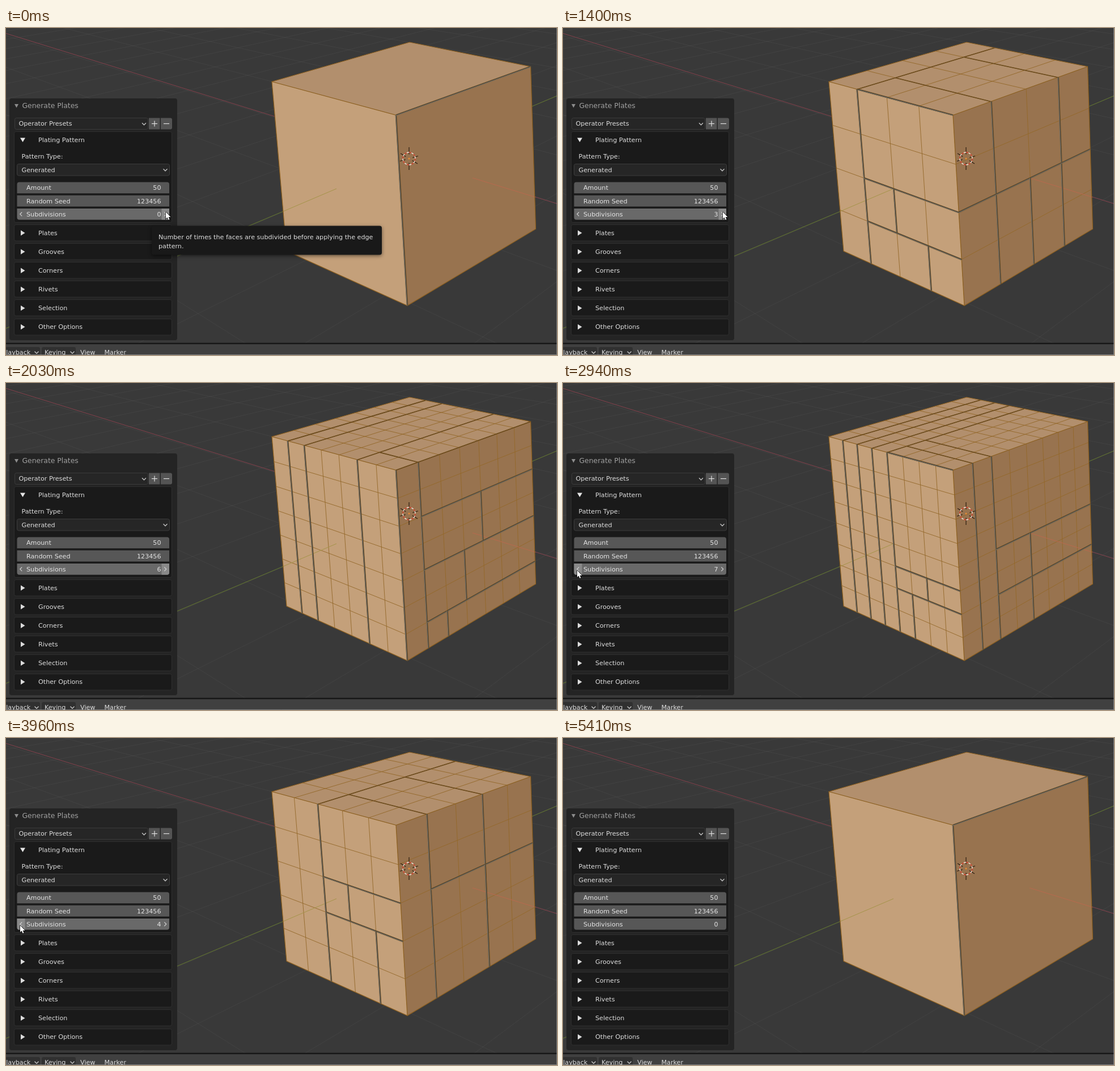
Write an HTML page with a canvas that moves like this. It is 972 px wide and 576 px high and loops after 5530 ms.

```html
<!DOCTYPE html>
<html lang="en">
<head>
<meta charset="utf-8">
<title>Generate Plates</title>
<style>
html, body { margin: 0; width: 100%; height: 100%; overflow: hidden; background: #393939; }
canvas { display: block; }
</style>
</head>
<body>
<canvas id="stage" width="972" height="576"></canvas>
<script>
const ctx = document.getElementById('stage').getContext('2d');
const LOOP = 5530;

// ---- timeline ----
const ups = [590, 1160, 1280, 1520, 1790, 2030, 2150];
const downs = [3210, 3600, 3840, 4080, 4200, 4350, 4470];
const path = [[0, 282, 324], [2430, 282, 324], [2790, 45, 324], [2940, 25, 330], [4600, 25, 330],
  [4740, 109, 378], [4890, 669, 502], [5160, 599, 147], [LOOP, 599, 147]];

const passed = (list, t) => list.filter(c => c <= t).length;
const levelAt = t => passed(ups, t) - passed(downs, t);
// the pointer is hidden while the button is held
const pressed = t => t < 4200 && [...ups, ...downs].some(c => t >= c && t < c + 120);

function pointerAt(t) {
  const i = path.findIndex(p => p[0] > t);
  const [t0, x0, y0] = path[i - 1], [t1, x1, y1] = path[i];
  const k = (t - t0) / (t1 - t0);
  return [x0 + (x1 - x0) * k, y0 + (y1 - y0) * k];
}

// Main cuts per level: full columns, rows, and the column where the rows begin
const cuts = [
  { L: [[], [], 0], R: [[0], [0], 0] },
  { L: [[1], [], 0], R: [[], [1], 0] },
  { L: [[1], [2], 1], R: [[1], [1], 1] },
  { L: [[1], [0, 2, 3], 1], R: [[1, 3], [2], 0] },
  { L: [[2], [2, 3], 2], R: [[1, 3], [2], 1] },
  { L: [[], [2, 4], 0], R: [[1, 2, 3, 4, 5], [2, 5], 3] },
  { L: [[1, 2, 5, 7], [], 0], R: [[1], [2, 4, 6], 1] },
  { L: [[1, 2, 3, 4], [0, 5, 6], 4], R: [[1, 2], [4, 6], 2] }
];
const random = seed => {
  const s = Math.sin(seed * 12.9898) * 43758.5453;
  return s - Math.floor(s);
};

// ---- projection: unit square to a quad with corners p0..p3 ----
function plane([x0, y0], [x1, y1], [x2, y2], [x3, y3]) {
  const ax = x1 - x2, bx = x3 - x2, ay = y1 - y2, by = y3 - y2;
  const sx = x0 - x1 + x2 - x3, sy = y0 - y1 + y2 - y3, det = ax * by - bx * ay;
  const g = (sx * by - bx * sy) / det, h = (ax * sy - sx * ay) / det;
  return (u, v) => {
    const w = 1 + g * u + h * v;
    return [((x1 - x0 + g * x1) * u + (x3 - x0 + h * x3) * v + x0) / w,
            ((y1 - y0 + g * y1) * u + (y3 - y0 + h * y3) * v + y0) / w];
  };
}
const A = [469, 94.5], B = [712, 25], C = [925.5, 68], D = [688, 153.5];
const E = [495, 393], F = [708, 489], G = [934.5, 354];
const faces = {
  L: { at: plane(A, D, F, E), fill: '#c4a07a' },
  T: { at: plane(A, D, C, B), fill: '#b28f6d' },
  R: { at: plane(D, C, G, F), fill: '#98734f' }
};
const ground = plane([711.5, 229.5], [823.5, 263.5], [697, 326], [583, 284]);

// ---- drawing helpers ----
function line(points, color, width = 1) {
  ctx.beginPath();
  points.forEach(p => ctx.lineTo(...p));
  ctx.strokeStyle = color;
  ctx.lineWidth = width;
  ctx.stroke();
}
function shape(points, fill) {
  ctx.beginPath();
  points.forEach(p => ctx.lineTo(...p));
  ctx.closePath();
  ctx.fillStyle = fill;
  ctx.fill();
}
function box(x, y, w, h, fill, r = 3, border) {
  ctx.beginPath();
  ctx.roundRect(x, y, w, h, r);
  ctx.fillStyle = fill;
  ctx.fill();
  if (border) {
    ctx.strokeStyle = border;
    ctx.lineWidth = 1;
    ctx.stroke();
  }
}
function text(s, x, y, color = '#dedede', align = 'left', size = 11.15) {
  ctx.font = size + 'px "DejaVu Sans", sans-serif';
  ctx.textAlign = align;
  ctx.fillStyle = color;
  ctx.fillText(s, x, y);
}
const down = (x, y) => line([[x - 3.5, y - 1.7], [x, y + 1.8], [x + 3.5, y - 1.7]], '#c4c4c4', 1.3);
const side = (x, y, d) => line([[x - 1.7 * d, y - 3.5], [x + 1.7 * d, y], [x - 1.7 * d, y + 3.5]], '#d4d4d4', 1.2);
const plus = (x, y) => line([[x, y - 5], [x, y + 5]], '#e0e0e0', 1.2);
const minus = (x, y) => line([[x - 5, y], [x + 5, y]], '#e0e0e0', 1.2);

// ---- scene ----
function drawGround() {
  ctx.fillStyle = '#393939';
  ctx.fillRect(0, 0, 972, 576);
  for (let k = -20; k <= 6; k++) {
    line([ground(k, -20), ground(k, 6)], 'rgba(255,255,255,.045)');
    line([ground(-20, k), ground(6, k)], 'rgba(255,255,255,.045)');
  }
  line([[0, 9.5], [972, 309.5]], '#82404b');
  line([[0, 529], [972, 119.5]], '#64782f');
}

const column = (face, k, from, to, n) => groove(face, [face.at(k / n, from / n), face.at(k / n, to / n)], -.7, 0);
const row = (face, k, from, to, n) => groove(face, [face.at(from / n, k / n), face.at(to / n, k / n)], 0, .7);

function groove(face, ends, dx, dy) {
  if (face === faces.T) return line(ends, '#6a4a1c', 1.6);
  line(ends, '#7a5720', 2.8);
  line(ends, '#484239', 1.7);
  line(ends.map(([x, y]) => [x + dx, y + dy]), '#86827a', .8);
}

function drawGrooves(level) {
  const n = level + 1, { L, R } = cuts[level];
  for (const [name, [cols, rows, start]] of Object.entries({ L, R })) {
    const face = faces[name];
    cols.forEach(k => column(face, k, 0, n, n));
    rows.forEach((k, i) => {
      row(face, k, start, n, n);
      // one short column splits the band below each row
      const split = start + 1 + Math.floor(random(level * 9 + k) * (n - start - 1));
      if (k && split < n) column(face, split, k, rows[i + 1] || n, n);
    });
  }
  // side columns run on across the top
  const last = Math.max(0, ...L[0].filter(k => k < n));
  L[0].forEach(k => column(faces.T, k, 0, n, n));
  R[0].forEach(k => k && row(faces.T, k, last, n, n));
}

function drawCube(level) {
  const n = level + 1;
  for (const { at, fill } of Object.values(faces)) {
    shape([at(0, 0), at(1, 0), at(1, 1), at(0, 1)], fill);
    for (let k = 1; k < n; k++) {
      line([at(k / n, 0), at(k / n, 1)], '#94682a', .9);
      line([at(0, k / n), at(1, k / n)], '#94682a', .9);
    }
  }
  line([[489, 323], [583, 283]], '#a59449');
  line([[823, 264], [934, 298]], '#b9694e');
  line([A, B, C, G, F, E, A, D, F], '#8d6020', 1.2);
  line([D, C], '#8d6020', 1.2);
  drawGrooves(level);
}

function drawOrigin() {
  const x = 711, y = 230;
  for (const [dx, dy] of [[0, 20], [16, -4.5], [15, 9]])
    for (const s of [-1, 1])
      line([[x + dx * s * .38, y + dy * s * .38], [x + dx * s, y + dy * s]], '#2a1d12', 1.2);
  ctx.lineWidth = 1.4;
  for (let i = 0; i < 16; i++) {
    ctx.beginPath();
    ctx.arc(x, y, 11, i * Math.PI / 8, (i + 1) * Math.PI / 8);
    ctx.strokeStyle = i % 2 ? '#f2e6dc' : '#d8402f';
    ctx.stroke();
  }
  box(x - 1.5, y - 1.5, 3, 3, '#e88a34', 1.5);
}

function drawField(label, value, y, r, hover, px) {
  box(19.5, y, 268.5, 19.7, hover ? '#696969' : '#575757', r);
  if (hover) {
    if (px < 34) box(19.5, y, 14, 19.7, '#898989', [0, 0, 0, 4]);
    if (px > 273) box(274.5, y, 13.5, 19.7, '#898989', [0, 0, 4, 0]);
    side(26.5, y + 9.7, -1);
    side(281, y + 9.7, 1);
  }
  text(label, 36, y + 13.7, '#e4e4e4');
  text(value, 273.5, y + 13.7, '#e4e4e4', 'right');
}

function drawPanel(level, hover, px) {
  box(6, 124, 296, 426, '#242424', 4);
  shape([[15, 134], [22, 134], [18.5, 140.5]], '#8c8c8c');
  text('Generate Plates', 28.5, 141.2, '#a0a0a0', 'left', 12.4);

  box(15.5, 158.5, 235, 20, '#262626', 3, '#3b3b3b');
  text('Operator Presets', 22.5, 172.2);
  down(243.5, 169);
  box(252, 158.5, 19.5, 20, '#545454', 0);
  box(273, 158.5, 20, 20, '#545454', [0, 3, 3, 0]);
  plus(262, 168.5);
  minus(262, 168.5);
  minus(283, 168.5);

  box(14.5, 182.5, 278, 160, '#1a1a1a', 3, '#2f2f2f');
  shape([[25, 193.5], [34, 193.5], [29.5, 201]], '#e6e6e6');
  text('Plating Pattern', 57, 200.8);
  text('Pattern Type:', 27.5, 230.2);
  box(19.5, 239.5, 269, 20.5, '#262626', 3, '#3d3d3d');
  text('Generated', 27.5, 253.7);
  down(281, 250);
  drawField('Amount', '50', 271.5, [4, 4, 0, 0]);
  drawField('Random Seed', '123456', 294.8, 0);
  drawField('Subdivisions', level, 318.1, [0, 0, 4, 4], hover, px);

  ['Plates', 'Grooves', 'Corners', 'Rivets', 'Selection', 'Other Options'].forEach((name, i) => {
    const y = 361 + i * 33.1;
    box(14.5, Math.round(y - 15) + .5, 278, 28.5, '#1a1a1a', 3, '#2f2f2f');
    shape([[26, y - 4.7], [26, y + 4.7], [33.5, y]], '#dcdcdc');
    text(name, 57, y + 3.9);
  });
}

function drawFooter() {
  ctx.fillStyle = '#404040';
  ctx.fillRect(0, 555, 972, 21);
  ctx.fillStyle = '#181818';
  ctx.fillRect(0, 554.5, 972, 2.5);
  box(-5, 562, 65, 20, '#303030', 3);
  box(63, 562, 60, 20, '#303030', 3);
  text('Playback', -6.5, 575.2);
  down(54, 571.5);
  text('Keying', 68, 575.2);
  down(117, 571.5);
  text('View', 131, 575.2);
  text('Marker', 173.5, 575.2);
  line([[0, 575.5], [971.5, 575.5], [971.5, 0]], 'rgba(190,190,190,.5)');
}

function drawTooltip() {
  ctx.save();
  ctx.shadowColor = 'rgba(0,0,0,.5)';
  ctx.shadowBlur = 6;
  ctx.shadowOffsetY = 2;
  box(257, 348.5, 406, 51, '#191919', 4);
  ctx.restore();
  text('Number of times the faces are subdivided before applying the edge', 269, 371.5);
  text('pattern.', 269, 388.3);
}

function drawPointer(x, y) {
  const arrow = [[0, 0], [0, 12], [2.7, 9.6], [4.5, 14], [6.4, 13.2], [4.7, 9], [8.4, 9]]
    .map(([a, b]) => [x + a, y + b]);
  line([...arrow, arrow[0]], '#111', 1.5);
  shape(arrow, '#fff');
}

function frame(now) {
  const t = now % LOOP, level = levelAt(t), [px, py] = pointerAt(t);
  drawGround();
  drawCube(level);
  drawOrigin();
  drawPanel(level, t < 4620, px);
  drawFooter();
  if (t < 590) drawTooltip();
  if (!pressed(t) && t < 5410) drawPointer(px, py);
  requestAnimationFrame(frame);
}
requestAnimationFrame(frame);
</script>
</body>
</html>
```
